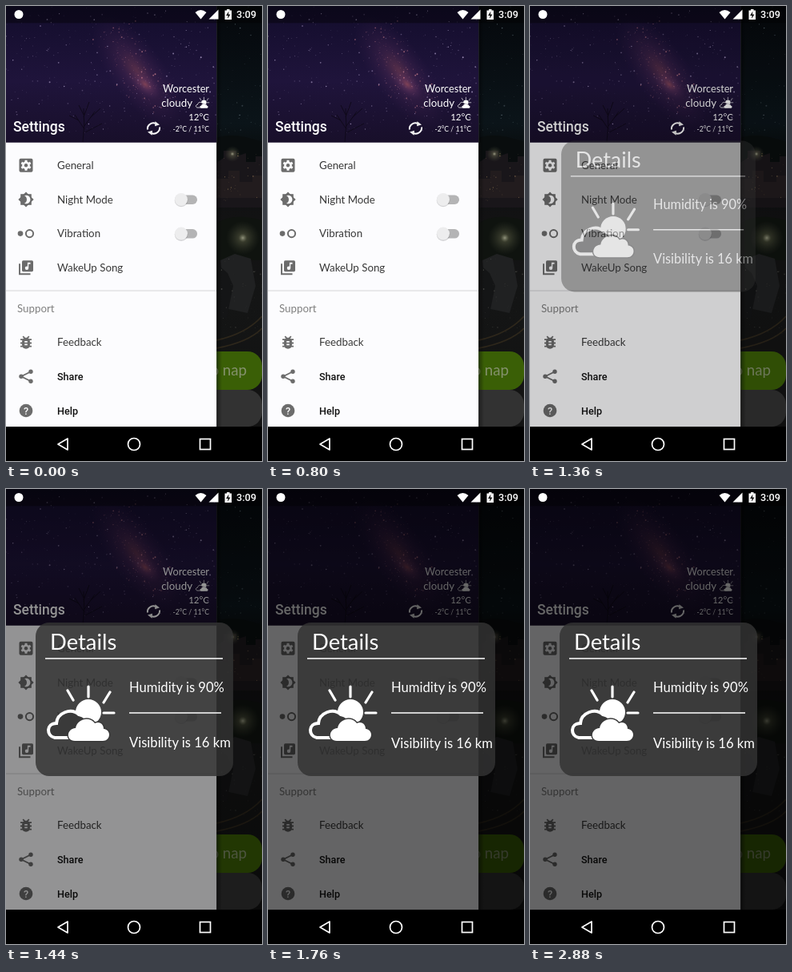
Animation of 320 by 569 pixels, one loop 2960 ms. Source, as an HTML page:

```html
<!DOCTYPE html>
<html lang="en">
<head>
<meta charset="utf-8">
<title>Settings drawer</title>
<style>
html, body { margin: 0; width: 100%; height: 100%; overflow: hidden; background: #000; }
svg { display: block; width: 100%; height: 100%; }
text { font: 13.3px Lato, "Open Sans", sans-serif; fill: #383838; }
text.ui { font: 500 12.6px Roboto, sans-serif; fill: #111; }
text.light { fill: #fff; }
.icon { fill: #6c6c6c; stroke: #6c6c6c; stroke-width: 0; }
.line { fill: none; stroke: #fff; }
</style>
</head>
<body>
<svg id="stage" viewBox="0 0 320 569">
  <defs>
    <linearGradient id="sky" x2="0" y2="1">
      <stop offset="0" stop-color="#130d2c"/>
      <stop offset=".55" stop-color="#1f143b"/>
      <stop offset="1" stop-color="#180f2a"/>
    </linearGradient>
    <radialGradient id="nebula">
      <stop offset="0" stop-color="#a85660" stop-opacity=".6"/>
      <stop offset=".4" stop-color="#6a3862" stop-opacity=".4"/>
      <stop offset="1" stop-color="#432658" stop-opacity="0"/>
    </radialGradient>
    <linearGradient id="night" x2="0" y2="1">
      <stop offset="0" stop-color="#05080c"/>
      <stop offset=".28" stop-color="#0b1419"/>
      <stop offset=".33" stop-color="#090e10"/>
      <stop offset=".5" stop-color="#121213"/>
      <stop offset=".7" stop-color="#141515"/>
      <stop offset="1" stop-color="#121212"/>
    </linearGradient>
    <radialGradient id="lamp">
      <stop offset="0" stop-color="#d8d9b8"/>
      <stop offset=".25" stop-color="#8a8b66" stop-opacity=".5"/>
      <stop offset="1" stop-color="#555a44" stop-opacity="0"/>
    </radialGradient>
    <linearGradient id="edge">
      <stop offset="0" stop-opacity=".45"/>
      <stop offset="1" stop-opacity="0"/>
    </linearGradient>
    <clipPath id="headClip"><path d="M0 0H263.100V170.700H0z"/></clipPath>
    <g id="weather">
      <path d="M26 6 33 18M52 1V14M79 8 71 21M71 34H84" class="line" stroke-width="3.2" stroke-linecap="round"/>
      <circle cx="52" cy="33" r="16" fill="#fff"/>
      <path d="M10 65C-1 63-1 47 12 47C13 34 30 27 40 36C47 37 51 42 51 47V65z" fill="currentColor" stroke="#fff" stroke-width="4"/>
      <path d="M35 69C24 69 24 54 36 53C38 41 54 38 60 47C67 44 71 49 71 54C81 55 80 69 70 69z" fill="#fff" stroke="currentColor" stroke-width="3" paint-order="stroke"/>
    </g>
  </defs>

  <g id="village">
    <rect width="320" height="526.200" fill="url(#night)"/>
    <path d="M263 165Q285 157 320 170V240H263z" fill="#090d0e"/>
    <path d="M263 196 272 190V181H288V188L300 184V195H312V188H320V252H263z" fill="#19161a"/>
    <path d="M263 216H278V206H292V220H308V212H320V240H263z" fill="#221c1e"/>
    <path d="M263 272Q282 258 320 268V318H263z" fill="#0f130f"/>
    <path d="M268 318 286 310 306 316 312 350 302 384 274 378z" fill="#202122"/>
    <path d="M263 322 277 334 284 350 276 390H263z" fill="#141516"/>
    <path d="M263 418Q300 410 320 388M263 428Q304 420 320 403" class="line" style="stroke:#2e271b" stroke-width="1.8"/>
    <circle cx="296" cy="290" r="21" fill="url(#lamp)" opacity=".65"/>
    <circle cx="283" cy="185" r="10" fill="url(#lamp)" opacity=".7"/>
    <g id="lights"></g>
    <rect x="150" y="480" width="170" height="46.200" rx="18" fill="#323232"/>
    <rect x="150" y="432" width="170" height="48" rx="18" fill="#3a5f06"/>
    <text x="301" y="461.500" text-anchor="end" style="font-size:18.7px;fill:#84916c">o nap</text>
    <rect x="263" width="7" height="526" fill="url(#edge)"/>
  </g>

  <rect width="263.100" height="526.200" fill="#fcfcfe"/>
  <g clip-path="url(#headClip)">
    <rect width="264" height="171" fill="url(#sky)"/>
    <ellipse cx="164" cy="82" rx="85" ry="34" fill="url(#nebula)" opacity=".7" transform="rotate(54 164 82)"/>
    <ellipse cx="174" cy="98" rx="24" ry="13" fill="url(#nebula)" transform="rotate(42 174 98)"/>
    <g id="stars"></g>
    <path d="M96 170Q99 150 97 128M98 154 86 136M98 150 111 132M105 140 118 128M91 143 79 137M99 158 120 147M97 136 91 124M97 139 104 120" class="line" style="stroke:#0f091a" stroke-width="1"/>
  </g>
  <rect width="320" height="21.300" opacity=".4"/>

  <text class="ui light" x="9" y="157" style="font-size:17.5px">Settings</text>
  <g text-anchor="end">
    <text class="light" x="254" y="108" style="font-size:12.7px">Worcester</text>
    <text class="light" x="233" y="126">cloudy</text>
    <text class="light" x="254" y="143" style="font-size:11.5px">12°C</text>
    <text class="light" x="254" y="157" style="font-size:8.7px">-2°C / 11°C</text>
  </g>
  <use href="#weather" transform="translate(237 114) scale(.2)" color="#1c1230"/>
  <g transform="translate(184.500 153)" fill="#eee">
    <path d="M-7.500 1.500A7.600 7 0 0 1 2.500-6.200M7.500-1.500A7.600 7 0 0 1-2.500 6.200" class="line" stroke-width="2"/>
    <path d="M2-8.700 7.500-4.500 1.500-2.800zM-2 8.700-7.500 4.500-1.500 2.800z"/>
  </g>

  <g id="rows"></g>
  <path d="M0 356H263" stroke="#d4d4d6"/>
  <text x="14" y="382.500" style="fill:#808080">Support</text>

  <rect id="dim" width="320" height="526.200" opacity="0"/>
  <g id="dialog" opacity="0">
    <rect x="37" y="167" width="247" height="192" rx="17" fill="#333" fill-opacity=".83"/>
    <text class="light" x="55" y="201" style="font-size:27.4px">Details</text>
    <path d="M49 212H271M154 280H269" class="line" stroke-width="1.4"/>
    <use href="#weather" x="51" y="246" color="#3a3a3a"/>
    <text class="light" x="154" y="253.500" style="font-size:16.6px">Humidity is 90%</text>
    <text class="light" x="154" y="323.500" style="font-size:16.6px">Visibility is 16 km</text>
  </g>

  <g fill="#fff">
    <circle cx="16" cy="10.500" r="5.500"/>
    <path d="M236.500 8Q243.500 2 250.500 8L243.500 16.500z"/>
    <path d="M253.500 16.500H265.500V4.500z"/>
    <path d="M273.500 5.500H276V4H279.500V5.500H282V17H273.500z"/>
    <path d="M278.500 6.500 275 12H277.500L277 16 280.500 10.500H278z" fill="#111"/>
    <text class="ui light" x="288" y="15" style="font-size:12.7px">3:09</text>
  </g>
  <rect y="526.200" width="320" height="43"/>
  <g class="line" stroke-width="1.7">
    <path d="M77 541V555L65 548z" stroke-linejoin="round"/>
    <circle cx="160" cy="548" r="7.500"/>
    <rect x="242.500" y="541.500" width="13" height="13"/>
  </g>
</svg>
<script>
const LOOP = 2960, STEP = 80, OPEN = 1300;
const $ = id => document.getElementById(id);
const clamp = v => Math.min(1, Math.max(0, v));

let seed = 17;
function rand() {
  seed = (seed * 16807) % 2147483647;
  return seed / 2147483647;
}

function dot(x, y, color) {
  return `<circle cx="${x.toFixed(1)}" cy="${y.toFixed(1)}" r="${(.3 + rand() ** 4 * .7).toFixed(2)}"
    fill="${color}" opacity="${(.25 + rand() * .6).toFixed(2)}"/>`;
}

function dots(n, x, y, w, h, color) {
  return Array.from({ length: n }, () => dot(x + rand() * w, y + rand() * h, color)).join('');
}

// Stars gathered along the slanting galaxy band.
function band(n, color) {
  return Array.from({ length: n }, () => {
    const along = rand(), off = (rand() + rand() - 1) * 32;
    return dot(132 + along * 62 + off, 28 + along * 100 - off * .5, color);
  }).join('');
}

$('stars').innerHTML = dots(320, 0, 0, 263, 160, '#b3a3cc') + band(190, '#c27a88');
$('lights').innerHTML = dots(40, 263, 0, 57, 160, '#73868c')
  + dots(34, 264, 182, 56, 62, '#b99a6a')
  + dots(40, 264, 315, 56, 100, '#66665f');

const teeth = [0, 60, 120].map(a =>
  `<rect x="-1.500" y="-6.500" width="3" height="13" transform="rotate(${a})"/>`).join('');

// Icons are drawn around their own centre.
const icons = {
  gear: `<rect x="-8.500" y="-8.500" width="17" height="17" rx="2"/>
    <g fill="#fcfcfe">${teeth}<circle r="4.800"/></g><circle r="2.200"/>`,
  night: `<rect x="-6.800" y="-6.800" width="13.600" height="13.600"/>
    <rect x="-6.800" y="-6.800" width="13.600" height="13.600" transform="rotate(45)"/>
    <path d="M-2-4.700A5.200 5.200 0 1 1-2 4.700A5.200 5.200 0 0 0-2-4.700" fill="#fcfcfe"/>`,
  dots: `<circle cx="-7" r="3.300"/><circle cx="4.500" r="4.600" fill="none" stroke-width="2"/>`,
  music: `<rect x="-5" y="-9" width="14" height="14" rx="1.600"/>
    <path d="M-8-5V8H5.500" fill="none" stroke-width="1.900"/>
    <g fill="#fcfcfe"><circle cx="1" cy=".5" r="2.200"/><path d="M1.900 .5V-6.500H5.500V-4.500H3.200V.5z"/></g>`,
  bug: `<rect x="-5" y="-6" width="10" height="14" rx="5"/>
    <path d="M-7-3.500H7M-7 .8H7M-7 5H7M-3.800-7.500-1.500-5M3.800-7.500 1.500-5" stroke-width="1.800"/>
    <path d="M-1.800-.9H1.800M-1.800 2.600H1.800" style="stroke:#fcfcfe" stroke-width="1.700"/>`,
  share: `<path d="M6-6-6 0 6 6" fill="none" stroke-width="1.800"/>
    <circle cx="6" cy="-6" r="2.700"/><circle cx="-6" r="2.700"/><circle cx="6" cy="6" r="2.700"/>`,
  help: `<circle r="8.300"/><text class="ui light" y="4.500" text-anchor="middle" stroke="none">?</text>`
};

const toggle = `<rect x="213" y="-5.500" width="26" height="11.500" rx="5.700" fill="#b4b4b5"/>
  <circle cx="219" cy="1" r="8.300" opacity=".16"/><circle cx="219" r="8" fill="#ededee"/>`;

const row = (y, icon, label, extra = '', cls = '') => `<g transform="translate(0 ${y})">
  <g class="icon" transform="translate(25 0)">${icons[icon]}</g>
  <text class="${cls}" x="64" y="4.700">${label}</text>${extra}</g>`;

$('rows').innerHTML = row(199.3, 'gear', 'General')
  + row(242, 'night', 'Night Mode', toggle)
  + row(284.6, 'dots', 'Vibration', toggle)
  + row(327.2, 'music', 'WakeUp Song')
  + row(420.7, 'bug', 'Feedback')
  + row(463.3, 'share', 'Share', '', 'ui')
  + row(506, 'help', 'Help', '', 'ui');

function draw(ms) {
  const t = Math.floor((ms % LOOP) / STEP) * STEP - OPEN;
  const p = clamp(t / 200);
  const scale = .9 + .1 * (1 - (1 - p) ** 5);
  $('dim').setAttribute('opacity', .6 * p);
  $('dialog').setAttribute('opacity', clamp(t / 130));
  $('dialog').setAttribute('transform',
    `translate(160 263) scale(${scale}) translate(-160 -263)`);
}

const start = performance.now();
function tick() {
  draw(performance.now() - start);
  requestAnimationFrame(tick);
}
tick();
</script>
</body>
</html>
```
